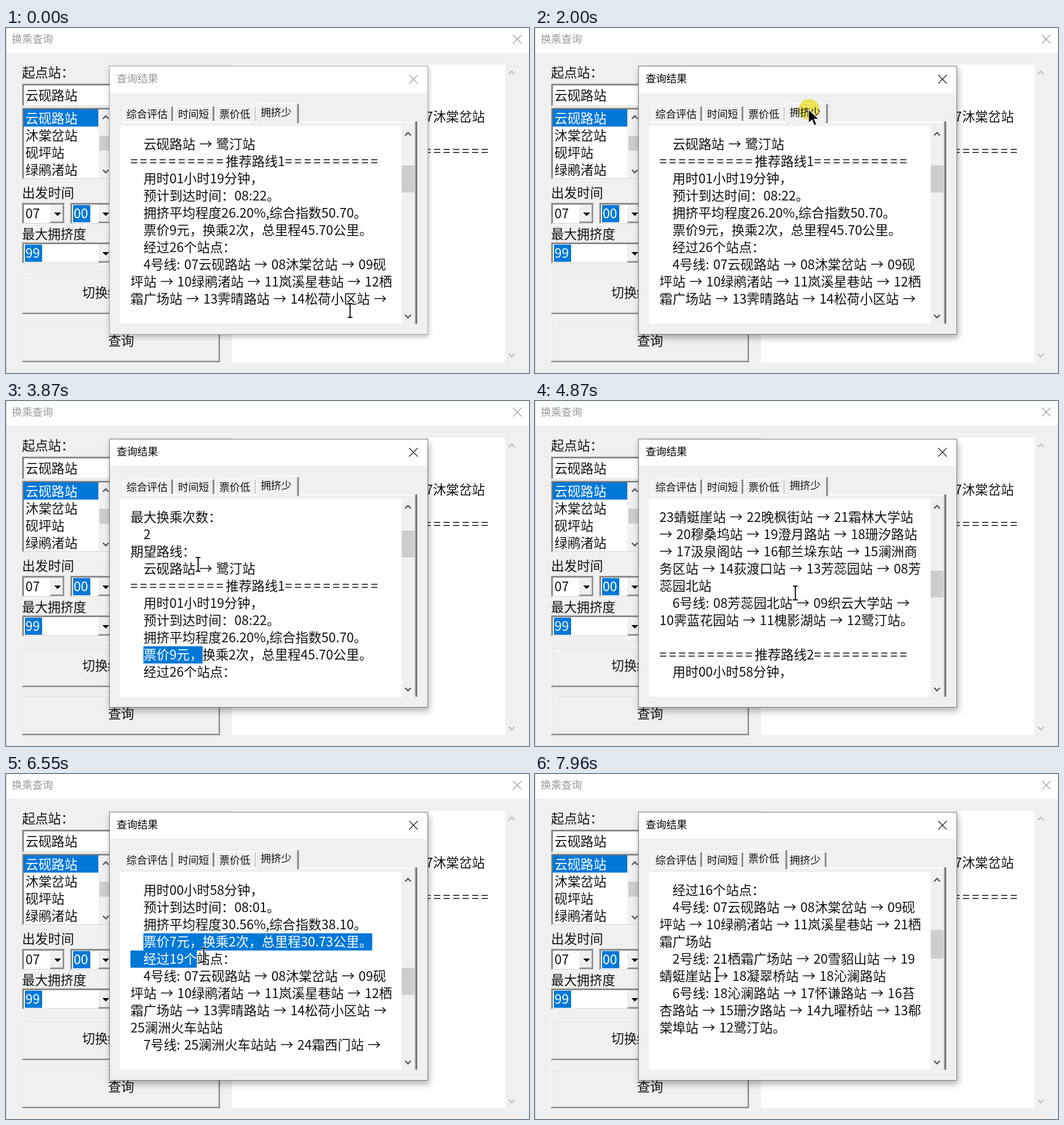
An HTML page that plays this animation: 912 by 602 pixels, repeating every 8 s.

```html
<!DOCTYPE html>
<html lang="zh-CN">
<head>
<meta charset="utf-8">
<title>换乘查询</title>
<style>
html, body { margin: 0; width: 100%; height: 100%; overflow: hidden; background: #f0f0f0; }
svg { display: block; width: 100vw; height: 100vh; }
text { font-family: "Noto Sans CJK SC", "Noto Sans CJK", "Noto Sans CJK JP", sans-serif; white-space: pre; }
#rows text { font-size: 22.67px; fill: #111; word-spacing: 1.75px; }
.eq { letter-spacing: 4.05px; }
#rows .hi { fill: #fff; }
#frame { stroke: #a6a6a6; filter: drop-shadow(1px 3px 4px rgba(0,0,0,.28)); }
.active #frame { stroke: #747474; filter: drop-shadow(2px 6px 6px rgba(0,0,0,.3)); }
#caption { fill: #999; }
#close { stroke: #999; }
.active #caption { fill: #000; }
.active #close { stroke: #111; }
#press { mix-blend-mode: multiply; }
</style>
</head>
<body>
<svg id="stage" viewBox="0 0 912 602"></svg>
<script>
const LOOP = 8000, FACE = '#f0f0f0', BLUE = '#0078d7', FONT = 22.67;
const ROWS = 10, LINE = 30, TEXT_X = 217, TEXT_Y = 203;

// ---------- drawing helpers ----------
const rect = (x, y, w, h, fill, more = '') =>
  `<rect x="${x}" y="${y}" width="${w}" height="${h}" fill="${fill}" ${more}/>`;
const label = (s, x, middle, size = FONT, fill = '#111', more = '') =>
  `<text x="${x}" y="${middle + size * 0.35}" font-size="${size}" fill="${fill}" ${more}>${s}</text>`;
const cross = (x, y, more) =>
  `<path d="M${x - 7.5},${y - 7.5}l15,15m0,-15l-15,15" fill="none" stroke-width="1.1" ${more}/>`;
const chevron = (x, y, dir, color = '#555') =>
  `<path d="M${x - 5},${y + 2.5 * dir}l5,${-5 * dir}l5,${5 * dir}" fill="none" stroke="${color}" stroke-width="2.4"/>`;
const sunken = (x, y, w, h) =>
  rect(x, y, w, h, '#fff') + rect(x, y, w - 1.5, h - 1.5, '#a0a0a0') +
  rect(x + 1.5, y + 1.5, w - 3, h - 3, '#e3e3e3') + rect(x + 1.5, y + 1.5, w - 4.5, h - 4.5, '#696969') +
  rect(x + 3, y + 3, w - 6, h - 6, '#fff');
const raised = (x, y, w, h) =>
  rect(x, y, w, h, '#696969') + rect(x, y, w - 1.5, h - 1.5, '#fff') +
  rect(x + 1.5, y + 1.5, w - 3, h - 3, '#a0a0a0') + rect(x + 1.5, y + 1.5, w - 4, h - 4, FACE);
const combo = (x, y, w, value, selected) =>
  sunken(x, y, w, 38) + (selected ? rect(x + 5, y + 4, 30, 30, BLUE) : '') +
  label(value, x + 6, y + 19, FONT, selected ? '#fff' : '#111') +
  raised(x + w - 27, y + 3, 24, 32) +
  `<path d="M${x + w - 20},${y + 17}h12l-6,6z"/>`;

function mainWindow() {
  const stations = ['云砚路站', '沐棠岔站', '砚坪站', '绿鹇渚站'];
  return rect(0, 0, 912, 602, FACE) + rect(0, 0, 912, 43, '#fff') + rect(0, 0, 1, 602, '#d4d4d4') +
    label('换乘查询', 10, 20, 18, '#999') + cross(891.5, 19.5, 'stroke="#999"') +
    label('起点站：', 28, 78) +
    sunken(28, 97, 200, 41) + label(stations[0], 34, 118) +
    sunken(28, 139, 200, 126) + rect(31, 142, 130, 30, BLUE) +
    stations.map((s, i) => label(s, 34, 158 + 30 * i, FONT, i ? '#111' : '#fff')).join('') +
    rect(161, 142, 30, 120, FACE) + rect(163, 188, 25, 26, '#cdcdcd') +
    chevron(174, 156, 1) + chevron(174, 250, -1) +
    label('出发时间', 28, 288) + combo(28, 305, 76, '07') + combo(112, 305, 76, '00', true) +
    label('最大拥挤度', 28, 360, 22.4) + combo(28, 374, 160, '99', true) +
    raised(28, 430, 345, 69) + label('切换终点', 133, 462, 22.2) +
    raised(28, 514, 345, 69) + label('查询', 178, 546) +
    rect(394, 64, 477, 519, '#fff') +
    label('07沐棠岔站', 719.5, 155) + label('==========', 679, 215, FONT, '#111', 'class="eq"') +
    chevron(882, 78, 1, '#bfbfbf') + chevron(882, 571, -1, '#bfbfbf');
}

function dialog() {
  let rows = '';
  for (let i = 0; i < ROWS; i++)
    rows += rect(TEXT_X, TEXT_Y - 15 + LINE * i, 0, LINE, BLUE) + label('', TEXT_X, TEXT_Y + LINE * i);
  return `<g id="dialog">` +
    rect(180.5, 66.5, 555, 468, FACE, 'id="frame"') + rect(181, 67, 554, 46, '#fff') +
    label('查询结果', 193, 89, 18, '', 'id="caption"') + cross(710.5, 89.5, 'id="close"') +
    rect(202, 163, 513, 2, '#fff') + rect(713, 163, 2, 353, '#a0a0a0') + rect(715, 163, 2, 353, '#696969') +
    `<g id="tabs"></g>` + rect(199, 171, 491, 345, '#fff') + rect(690, 171, 23, 345, FACE) +
    chevron(701, 185, 1) + chevron(701, 503, -1) +
    rect(690, 0, 22, 46, '#cdcdcd', 'id="thumb"') + `<g id="rows">${rows}</g></g>`;
}

const pointers =
  `<circle id="press" r="18" fill="#faf05a"/>
   <path id="arrow" d="M0,0V24L6,18.5L10,28L14,26L10,17H18Z" stroke="#fff" stroke-width="1.2"/>
   <g id="beam" fill="none">${['#fff" stroke-width="4', '#000" stroke-width="1.8'].map(s =>
     `<path stroke="${s}" d="M-4,-12h3l1,1l1,-1h3M0,-11V11M-4,12h3l1,-1l1,1h3"/>`).join('')}</g>`;

const TABS = [['综合评估', 204, 291, 210], ['时间短', 293, 363, 300], ['票价低', 365, 437, 372], ['拥挤少', 437, 508, 444]];
function tabStrip(current) {
  const draw = ([name, left, right, x], on) => {
    const l = left - 2 * on, r = right + 2.5 * on, top = 135 - 4 * on, bottom = 163 + 4 * on;
    return rect(l, top, r - l, bottom - top, FACE) + rect(l, top + 2, 1.5, bottom - top - 2, '#fff') +
      rect(l + 2, top, r - l - 4, 1.5, '#fff') + rect(r - 3, top + 2, 1.5, bottom - top - 3, '#a0a0a0') +
      rect(r - 1.5, top + 2, 1.5, bottom - top - 3, '#696969') + label(name, x, 151 - 3 * on, 18);
  };
  return TABS.map((tab, i) => i === current ? '' : draw(tab, 0)).join('') + draw(TABS[current], 1);
}

// ---------- result texts ----------
const header = mode => ['查询方式：', '　' + mode, '出发时间：', '　07:00', '最大拥挤度：', '　99%',
  '最大换乘次数：', '　2', '期望路线：', '　云砚路站 → 鹭汀站'];
const summary = (n, hour, minute, arrival, crowd, score, price, km, stops) => [
  `==========推荐路线${n}==========`, `　用时${hour}小时${minute}分钟，`, `　预计到达时间：${arrival}。`,
  `　拥挤平均程度${crowd}%,综合指数${score}。`, `　票价${price}元，换乘2次，总里程${km}公里。`, `　经过${stops}个站点：`];
const start = ['　4号线: 07云砚路站 → 08沐棠岔站 → 09砚'];
const shared = [...start, '坪站 → 10绿鹇渚站 → 11岚溪星巷站 → 12栖',
  '霜广场站 → 13霁晴路站 → 14松荷小区站 →', '25澜洲火车站站', '　7号线: 25澜洲火车站站 → 24霜西门站 →'];
const crowdDoc = [...header('拥挤少'),
  ...summary(1, '01', '19', '08:22', '26.20', '50.70', 9, '45.70', 26), ...shared,
  '23蜻蜓崖站 → 22晚枫街站 → 21霜林大学站', '→ 20穆桑坞站 → 19澄月路站 → 18珊汐路站',
  '→ 17汲泉阁站 → 16郁兰垛东站 → 15澜洲商', '务区站 → 14荻渡口站 → 13芳蕊园站 → 08芳', '蕊园北站',
  '　6号线: 08芳蕊园北站 → 09织云大学站 →', '10霁蓝花园站 → 11槐影湖站 → 12鹭汀站。', '',
  ...summary(2, '00', '58', '08:01', '30.56', '38.10', 7, '30.73', 19), ...shared];
const fareDoc = [...header('票价低'),
  ...summary(1, '00', '49', '07:52', '34.15', '36.40', 6, '24.18', 16), ...start,
  '坪站 → 10绿鹇渚站 → 11岚溪星巷站 → 21栖', '霜广场站',
  '　2号线: 21栖霜广场站 → 20雪貂山站 → 19', '蜻蜓崖站 → 18凝翠桥站 → 18沁澜路站',
  '　6号线: 18沁澜路站 → 17怀谦路站 → 16苔', '杏路站 → 15珊汐路站 → 14九曜桥站 → 13郗', '棠埠站 → 12鹭汀站。'];

// ---------- timeline ----------
const TAB_SWITCH = 7520, ACTIVATE = 1400;
const PRESSES = [[1450, 2080], [7380, 7580]];
const PATH = [[70, 600, 493], [830, 424, 177], [900, 424, 172], [1300, 477, 142], [2080, 477, 142],
  [2330, 453, 328], [2630, 453, 328], [2950, 240, 262], [3250, 343, 263], [3410, 335, 285], [4340, 335, 285],
  [4700, 454, 335], [5350, 454, 335], [5620, 262, 345], [5700, 262, 345], [5950, 240, 295], [6360, 345, 316],
  [6550, 345, 316], [6750, 344, 296], [6850, 344, 296], [7220, 407, 140], [7540, 407, 140], [7720, 317, 350]];
const SCROLL = [[0, 9], [2330, 12], [3480, 9], [3560, 6], [4100, 9], [4250, 12], [4340, 15], [4500, 18], [4650, 21],
  [5170, 24], [5250, 27], [5400, 30], [TAB_SWITCH, 0], [7660, 3], [7720, 6], [7790, 9], [7860, 12], [7940, 15]];

const progress = (t, a, b) => Math.min(1, Math.max(0, (t - a) / (b - a)));
const smooth = p => p * p * (3 - 2 * p);

function pointerAt(t) {
  const next = PATH.findIndex(k => k[0] > t);
  if (next === 0) return PATH[0].slice(1);
  if (next < 0) return PATH[PATH.length - 1].slice(1);
  const [t0, x0, y0] = PATH[next - 1], [t1, x1, y1] = PATH[next], p = smooth(progress(t, t0, t1));
  return [x0 + (x1 - x0) * p, y0 + (y1 - y0) * p];
}

// Selected character ranges, keyed by line index.
function selectionAt(t) {
  if (t < 2950 || t >= 6850) return {};
  if (t < 6040) return { 14: [1, 1 + Math.round(5 * progress(t, 2950, 3250))] };
  if (t < 6200) return { 33: [1, 1 + Math.ceil(5 * progress(t, 6040, 6200))] };
  if (t < 6650) return { 33: [1, crowdDoc[33].length], 34: [0, 6] };
  return { 33: [1, 6] };
}

// ---------- rendering ----------
const stage = document.getElementById('stage');
stage.innerHTML = mainWindow() + dialog() + pointers;
const el = id => document.getElementById(id);
const bars = el('rows').querySelectorAll('rect'), texts = el('rows').querySelectorAll('text');
const spaced = s => s.replace(/=+/g, '<tspan class="eq">$&</tspan>');
let shown = '';

function showText(doc, top, selection) {
  const key = (doc === fareDoc) + '|' + top + JSON.stringify(selection);
  if (key === shown) return;
  shown = key;
  texts.forEach((text, i) => {
    const line = doc[top + i] || '', [a, b] = selection[top + i] || [0, 0];
    text.innerHTML = b > a
      ? line.slice(0, a) + `<tspan class="hi">${line.slice(a, b)}</tspan>` + line.slice(b)
      : spaced(line);
    bars[i].setAttribute('x', TEXT_X + (a ? text.getSubStringLength(0, a) : 0));
    bars[i].setAttribute('width', b > a ? text.getSubStringLength(a, b - a) : 0);
  });
  const fare = doc === fareDoc;
  el('thumb').setAttribute('y', Math.round(198 + top * (fare ? 4.93 : 4.68)));
  el('thumb').setAttribute('height', fare ? 50 : 47);
  el('tabs').innerHTML = tabStrip(fare ? 2 : 3);
}

function place(id, x, y, visible) {
  el(id).setAttribute('transform', `translate(${x},${y})`);
  el(id).setAttribute('visibility', visible ? 'visible' : 'hidden');
}

function render(now) {
  const t = now % LOOP, [x, y] = pointerAt(t).map(Math.round);
  const top = SCROLL.filter(s => s[0] <= t).pop()[1];
  showText(t < TAB_SWITCH ? crowdDoc : fareDoc, top, selectionAt(t));
  el('dialog').setAttribute('class', t < ACTIVATE ? '' : 'active');
  const overText = y > 171;
  place('arrow', x, y, !overText);
  place('beam', x, y, overText);
  place('press', x + 1, y, PRESSES.some(([a, b]) => t >= a && t < b));
}

let begin;
function tick(now) {
  begin ??= now;
  render(now - begin);
  requestAnimationFrame(tick);
}
render(0);
requestAnimationFrame(tick);
</script>
</body>
</html>
```
